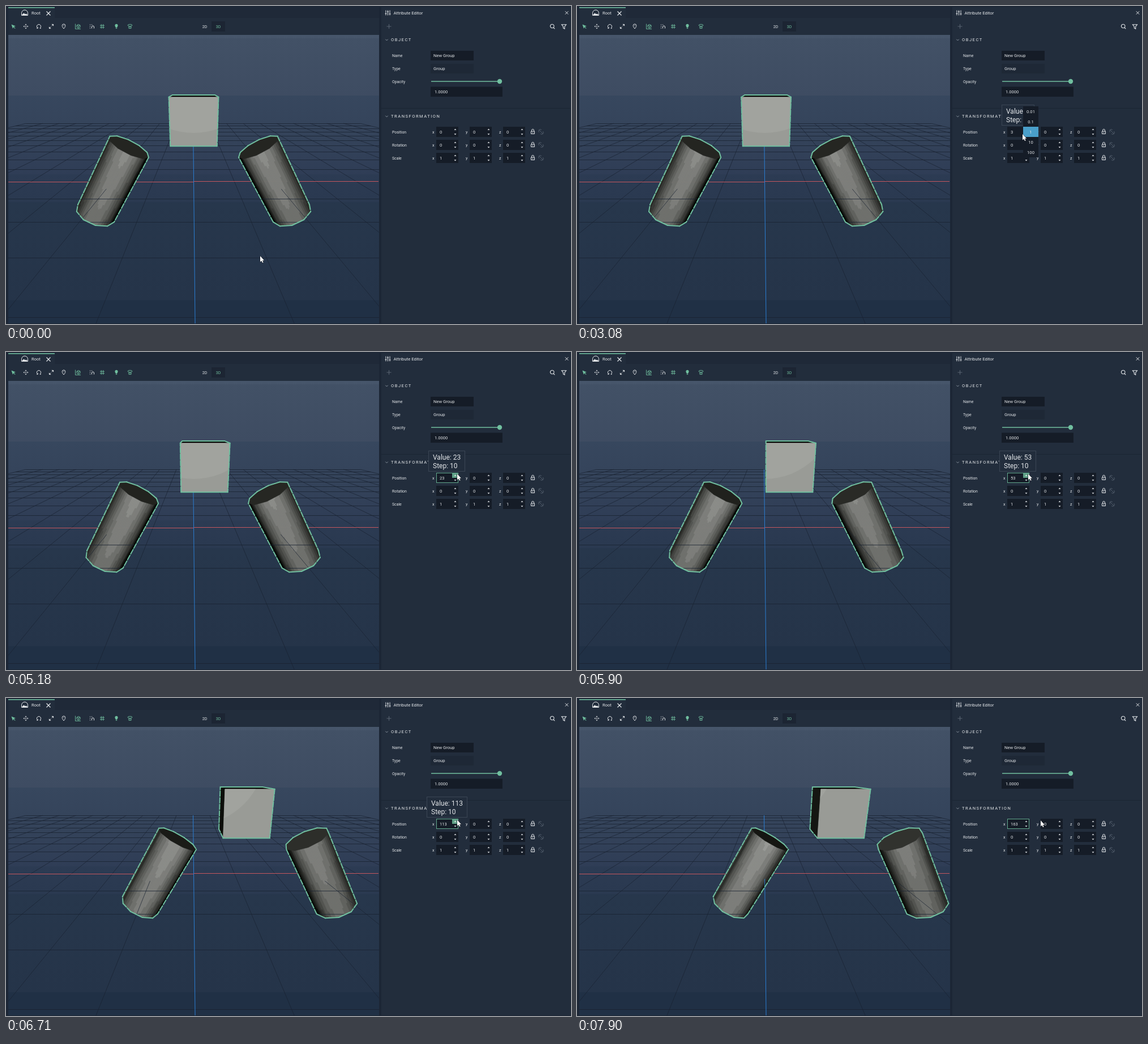
An HTML page with a canvas for the animation above (8 s loop, 998 by 561 pixels).

```html
<!DOCTYPE html>
<html lang="en">
<head>
<meta charset="utf-8">
<title>Attribute Editor</title>
<style>
html, body { margin: 0; width: 100%; height: 100%; overflow: hidden; background: #1c2635; }
canvas { display: block; width: 998px; height: 561px; }
</style>
</head>
<body>
<canvas id="stage" width="998" height="561"></canvas>
<script>
const ctx = document.getElementById('stage').getContext('2d');
const LOOP = 8000;
const TEAL = '#70bf9f', WHITE = '#e4e7ea', DARK = '#151c27', PANEL = '#222d3c', GREY = '#5a6573';

// ---------- timeline ----------
const VALUES = [[0, 0], [1600, 1], [2000, 2], [2380, 3], [4370, 13], [4900, 23], [5300, 33],
  [5750, 43], [5900, 53], [6030, 63], [6160, 73], [6290, 83], [6420, 93], [6560, 103],
  [6710, 113], [6840, 123], [6970, 133], [7110, 143], [7260, 153], [7380, 163]];
// Cursor moves: start, end, number of held steps, target
const MOVES = [[150, 1060, 8, 779, 219], [1210, 1340, 2, 797, 215], [2930, 3080, 2, 787, 226],
  [3350, 3480, 2, 797, 240], [3860, 4110, 3, 797, 215], [7780, 7900, 2, 819, 216]];
const CARET = [[1470, 1740], [2260, 2500], [4240, 4900], [5200, 5600], [6420, 6710]];

const within = (t, a, b) => t >= a && t < b;

function cursorAt(t) {
  let x = 449, y = 441;
  for (const [a, b, n, tx, ty] of MOVES) {
    if (t < a) break;
    const k = Math.min(n, 1 + Math.floor((t - a) / (b - a) * (n - 1) + 1e-6)) / n;
    const e = k * k * (3 - 2 * k);
    x += (tx - x) * e;
    y += (ty - y) * e;
  }
  return [x, y];
}

function stateAt(t) {
  return {
    value: VALUES.filter(k => k[0] <= t).pop()[1],
    step: t < 3620 ? 1 : 10,
    cursor: cursorAt(t),
    hover: within(t, 1340, 2780) || within(t, 4110, 7780),
    pressed: within(t, 6420, 6560),
    focus: within(t, 1470, 2780) || t >= 4240,
    tip: within(t, 1740, 3620) || within(t, 4520, 7780),
    menu: within(t, 2780, 3620),
    pick: t < 3480 ? 2 : 3,
    caret: CARET.some(c => within(t, c[0], c[1]))
  };
}

// ---------- drawing helpers ----------
function rect(x, y, w, h, color) {
  ctx.fillStyle = color;
  ctx.fillRect(x, y, w, h);
}

function text(s, x, y, size = 7.6, color = WHITE, align = 'left', spacing = 0) {
  ctx.font = size + 'px Roboto, sans-serif';
  ctx.letterSpacing = spacing + 'px';
  ctx.textAlign = align;
  ctx.textBaseline = 'alphabetic';
  ctx.fillStyle = color;
  ctx.fillText(s, x, y + size * 0.36);
  ctx.letterSpacing = '0px';
}

function icon(d, x, y, color, fill = false, width = 1) {
  ctx.save();
  ctx.translate(x, y);
  const p = new Path2D(d);
  ctx.lineWidth = width;
  ctx.strokeStyle = ctx.fillStyle = color;
  if (fill) ctx.fill(p); else ctx.stroke(p);
  ctx.restore();
}

function trace(pts) {
  ctx.beginPath();
  pts.forEach(([x, y], i) => i ? ctx.lineTo(x, y) : ctx.moveTo(x, y));
  ctx.closePath();
}

function poly(pts, color) {
  trace(pts);
  ctx.fillStyle = ctx.strokeStyle = color;
  ctx.fill();
  ctx.lineWidth = 0.7;
  ctx.stroke();
}

function line(x1, y1, x2, y2, color, width = 1) {
  ctx.beginPath();
  ctx.moveTo(x1, y1);
  ctx.lineTo(x2, y2);
  ctx.strokeStyle = color;
  ctx.lineWidth = width;
  ctx.stroke();
}

// ---------- camera and light ----------
const FOCAL = 467.5, DIST = 649, SIN = 0.35, COS = 0.937;
const EYE = [0, DIST * SIN, DIST * COS];

function project([x, y, z]) {
  const k = FOCAL / (DIST - y * SIN - z * COS);
  return [331.5 + x * k, 310 - (y * COS - z * SIN) * k];
}

function facing(p, n) {
  const l = EYE.map((e, i) => e - p[i]);
  return (l[0] * n[0] + l[1] * n[1] + l[2] * n[2]) / Math.hypot(...l);
}

const tone = d => {
  d = Math.max(0, d);
  return 5 + 140 * d ** 1.25 + 16 * d ** 30;
};
const grey = c => `rgb(${c | 0},${c + 1 | 0},${Math.max(0, c - 3) | 0})`;

function hull(pts) {
  const sorted = [...pts].sort((a, b) => a[0] - b[0] || a[1] - b[1]);
  const half = list => {
    const h = [];
    for (const p of list) {
      while (h.length > 1) {
        const [a, b] = h.slice(-2);
        if ((b[0] - a[0]) * (p[1] - a[1]) - (b[1] - a[1]) * (p[0] - a[0]) > 0) break;
        h.pop();
      }
      h.push(p);
    }
    return h.slice(0, -1);
  };
  return [...half(sorted), ...half(sorted.reverse())];
}

function outline(pts) {
  const h = hull(pts);
  ctx.lineCap = 'round';
  h.forEach((a, i) => {
    const b = h[(i + 1) % h.length];
    const steep = Math.abs(b[1] - a[1]) > Math.abs(b[0] - a[0]);
    ctx.setLineDash(steep ? [9, 2.6] : []);
    line(...a, ...b, TEAL, 2);
  });
  ctx.setLineDash([]);
  ctx.lineCap = 'butt';
}

// ---------- scene ----------
function grid() {
  const HORIZON = 135.5, ink = 'rgba(24,33,48,.85)';
  const u = n => 1 / (0.005714 - 0.0008245 * n);
  const far = u(-10);
  const at = (m, v) => 329.8 + v * (0.01 + 0.412 * m);
  for (let n = -10; n <= 4; n++) {
    const y = Math.floor(HORIZON + u(n)) + 0.5;
    if (n) line(at(-10, u(n)), y, at(10, u(n)), y, ink, 0.9);
  }
  for (let m = -10; m <= 10; m++) {
    if (m) line(at(m, far), HORIZON + far, at(m, 426), 561, ink, 0.8);
  }
  line(4, 310.5, 331, 310.5, '#c4565d');
  line(331, 309.5, 658, 309.5, '#c4565d');
  line(at(0, far), HORIZON + far, at(0, 426), 561, '#2b7fd4');
}

function backdrop() {
  const g = ctx.createLinearGradient(0, 51, 0, 561);
  [[51, '#47566b'], [57, '#46556a'], [57, '#425166'], [158, '#3e4c62'], [158, '#37475e'],
    [230, '#34435a'], [297, '#2f3d56'], [297, '#2c3b53'], [346, '#2a3950'], [346, '#27374c'],
    [519, '#253449'], [519, '#203045'], [561, '#203045']]
    .forEach(([y, c]) => g.addColorStop((y - 51) / 510, c));
  rect(4, 51, 655, 509, g);
}

function cube(v) {
  const p = (x, y, z) => project([v + x * 50, 150 + y * 50, z * 50]);
  const face = (a, b, c, d) => [p(...a), p(...b), p(...c), p(...d)];
  poly(face([-1, 1, 1], [1, 1, 1], [1, 1, -1], [-1, 1, -1]), '#050604');
  if (v > 50) {
    const c = tone(facing([v - 50, 150, 0], [-1, 0, 0]));
    poly(face([-1, 1, 1], [-1, 1, -1], [-1, -1, -1], [-1, -1, 1]), grey(c));
  }
  const front = face([-1, 1, 1], [1, 1, 1], [1, -1, 1], [-1, -1, 1]);
  poly(front, '#999b96');
  ctx.save();
  trace(front);
  ctx.clip();
  ctx.beginPath();
  ctx.arc(331.5, 98, 126, 0, 7);
  ctx.fillStyle = '#a1a39e';
  ctx.fill();
  ctx.restore();
  const all = [];
  for (let i = 0; i < 8; i++) all.push(p(i & 1 ? 1 : -1, i & 2 ? 1 : -1, i & 4 ? 1 : -1));
  outline(all);
}

// side is 1 for the left cylinder, -1 for its mirror image
function cylinder(v, side) {
  const N = 10, SUB = 10, ROWS = 50, BAND = 14, A = 0.5, B = 0.866;
  const ring = i => [Math.cos(i * 2 * Math.PI / N), Math.sin(i * 2 * Math.PI / N)];
  const point = ([c, s], h) => [v + side * (-200 + h * A + 50 * c * B), h * B - 50 * c * A, 50 * s];
  const normal = ([c, s]) => [side * c * B, -c * A, s];
  const mix = (a, b, k) => a.map((e, i) => e + (b[i] - e) * k);
  const rim = h => Array.from({ length: N }, (_, i) => project(point(ring(i), h)));

  function shade(c, h) {
    let d = facing(point(c, h), normal(c).map(e => e / Math.hypot(...c)));
    d -= 0.25 * Math.max(0, c[0]) ** 3;
    d = Math.max(d, 0.42 * Math.max(0, -c[0]));
    return Math.round(tone(d) / BAND) * BAND;
  }

  for (let i = 0; i < N; i++) {
    const a = ring(i), b = ring(i + 1), mid = mix(a, b, 0.5);
    if (facing(point(mid, 0), normal(mid)) <= 0) continue;
    for (let j = 0; j < SUB; j++) {
      const l = mix(a, b, j / SUB), r = mix(a, b, (j + 1) / SUB), m = mix(l, r, 0.5);
      let start = 0, tint = null;
      for (let k = 0; k <= ROWS; k++) {
        const next = k < ROWS ? shade(m, -100 + 200 * (k + 0.5) / ROWS) : -1;
        if (next === tint) continue;
        if (tint !== null) {
          const h0 = -100 + 200 * start / ROWS, h1 = -100 + 200 * k / ROWS;
          poly([point(l, h0), point(r, h0), point(r, h1), point(l, h1)].map(project), grey(tint));
        }
        start = k;
        tint = next;
      }
    }
  }
  const top = rim(100), bottom = rim(-100);
  poly(top, grey(tone(facing(point([0, 0], 100), [side * A, B, 0]))));

  // The half under the floor shows the grid in front of it
  const cut = [];
  for (let i = 0; i <= N / 2; i++) cut.push(project(point(ring(i), 50 * ring(i)[0] * A / B)));
  ctx.save();
  trace([...cut, ...bottom.slice(0, N / 2 + 1).reverse()]);
  ctx.clip();
  grid();
  ctx.restore();
  outline([...top, ...bottom]);
}

function viewport(v) {
  ctx.save();
  ctx.beginPath();
  ctx.rect(4, 51, 655, 509);
  ctx.clip();
  backdrop();
  grid();
  cube(v);
  cylinder(v, 1);
  cylinder(v, -1);
  ctx.restore();
}

// ---------- interface ----------
function toolbar() {
  rect(4, 2, 655, 49, PANEL);
  rect(86, 2, 573, 19, '#1f2938');
  rect(4, 2, 82, 1.6, TEAL);
  icon('M-5.5 4.5V.5A5.5 5.5 0 0 1 5.5 .5V4.5Z', 33, 12, WHITE);
  icon('M-4.5 4.5V3L-1.5 .5L1 2.5L2.5 1.5L4.5 3V4.5Z', 33, 12, WHITE, true);
  text('Root', 45, 12.5);
  icon('M-3.5 -3.5L3.5 3.5M3.5 -3.5L-3.5 3.5', 75, 13, WHITE, false, 1.2);

  icon('M-3.5 -3.5L4 -.5L1 .6L3.5 3.3L2.8 4L.2 1.3L-1 4Z', 13, 36, TEAL, true);
  icon('M0 -4.5L1.6 -2.4H-1.6ZM0 4.5L1.6 2.4H-1.6ZM-4.5 0L-2.4 -1.6V1.6ZM4.5 0L2.4 -1.6V1.6ZM-.8 -.8H.8V.8H-.8Z', 35, 36, WHITE, true);
  icon('M-2.2 3A3.6 3.6 0 1 1 2.2 3M-3.8 3.3H-1.8V1.3M3.8 3.3H1.8', 58, 36, WHITE);
  icon('M-3.5 3.5L-.8 .8M.8 -.8L3.5 -3.5M.8 -3.6H3.6V-.8M-.8 3.6H-3.6V.8', 80, 36, WHITE);
  icon('M0 4C-3 .5 -2.8 -.5 -2.8 -1.3A2.8 2.8 0 0 1 2.8 -1.3C2.8 -.5 3 .5 0 4ZM-.6 -1.3H.6', 102, 36, WHITE);
  icon('M-4.5 -4.5V4.5H5M-2 -2L1 -3.5L4 -2V1.5L1 3L-2 1.5ZM-2 -2L1 -.5L4 -2M1 -.5V3', 127, 36, TEAL, false, 0.9);
  icon('M-4 -3H-2.8M-1 -3H.2M-4 0H-2.8M-4 3H-2.8M-.5 3.5V1A2 2 0 0 1 3.5 1V3.5', 152, 36, WHITE);
  icon('M-1.7 -4V4M1.7 -4V4M-4 -1.7H4M-4 1.7H4', 170, 36, TEAL, false, 0.9);
  icon('M-1.2 2C-1.2 .8 -2.6 0 -2.6 -1.6A2.6 2.6 0 0 1 2.6 -1.6C2.6 0 1.2 .8 1.2 2ZM-1.2 2.8H1.2V4H-1.2Z', 195, 36, TEAL, true);
  icon('M-4 -2A4 1.7 0 0 1 4 -2A4 1.7 0 0 1 -4 -2M-2.5 1H2.5M-2 1V3.5H2V1', 219, 36, TEAL, false, 0.9);
  rect(363, 27, 24, 18, '#1c2533');
  text('2D', 351, 36.5, 7, WHITE, 'center');
  text('3D', 375, 36.5, 7, TEAL, 'center');
}

function arrows(x, y) {
  icon('M-2 -3.3L0 -5.6L2 -3.3ZM-2 3.3L0 5.6L2 3.3Z', x, y, WHITE, true);
}

function section(title, y) {
  icon('M-2.2 -1L0 1.2L2.2 -1', 672.5, y, '#9aa4ae', false, 0.9);
  text(title, 680, y, 7.5, WHITE, 'left', 1.55);
}

function row(label, y, values, locked) {
  text(label, 682, y + 0.5, 6.9);
  values.forEach((v, i) => {
    const x = 760 + i * 59;
    text('xyz'[i], x - 7, y, 7.2);
    rect(x, y - 9, 39, 18, DARK);
    text(v, x + 6, y + 0.5);
    arrows(x + 33.5, y);
  });
  if (locked) icon('M-3 -.5H3V4H-3ZM-2 -.5V-2.2A2 2 0 0 1 2 -2.2V-.5M0 1V2.6', 930.5, y - 0.5, WHITE);
  icon('M-3.4 .8A2.9 2.9 0 0 1 .8 -3.4M3.4 -.8A2.9 2.9 0 0 1 -.8 3.4M-3.5 -3.5L3.5 3.5', 945, y, GREY, false, 0.9);
}

function panel(value) {
  rect(663, 2, 334, 558, PANEL);
  icon('M-3.5 -4.5V4.5M0 -4.5V4.5M3.5 -4.5V4.5M-5 1.5H-2M-1.5 -2H1.5M2 2H5', 674.5, 12, WHITE, false, 0.95);
  text('Attribute Editor', 684.5, 12.5, 7.75);
  icon('M-2.7 -2.7L2.7 2.7M2.7 -2.7L-2.7 2.7', 990.5, 12, WHITE);
  icon('M-4 0H4M0 -4V4', 676.5, 36, GREY);
  icon('M3 -.5A3.3 3.3 0 1 1 -3.6 -.5A3.3 3.3 0 1 1 3 -.5M2 2L4.3 4.3', 965, 36, WHITE, false, 1.1);
  icon('M-4 -3.7H4L1.2 0V3.8L-1.2 2.5V0Z', 985.5, 36.5, WHITE, false, 1.1);

  section('OBJECT', 59.7);
  text('Name', 682, 88, 6.9);
  rect(750, 79, 76, 17, DARK);
  text('New Group', 755, 87.7);
  text('Type', 682, 111, 6.9);
  rect(750, 102, 76, 17, '#1e2836');
  text('Group', 755, 110.7);
  text('Opacity', 682, 133.5, 6.9);
  line(751, 133, 872, 133, TEAL, 1.3);
  ctx.beginPath();
  ctx.arc(872, 133, 4.2, 0, 7);
  ctx.fillStyle = TEAL;
  ctx.fill();
  rect(750, 142.5, 127, 17.5, DARK);
  text('1.0000', 757, 151.5);

  line(663, 180.5, 997, 180.5, '#1b2533');
  section('TRANSFORMATION', 194.6);
  row('Position', 222, [value, 0, 0], true);
  row('Rotation', 245, [0, 0, 0], true);
  row('Scale', 268, [1, 1, 1], true);
}

function editing(s) {
  if (s.hover) {
    rect(788, 213.5, 10.5, 8.5, s.pressed ? '#44705f' : '#5fa187');
    icon('M-2 1L0 -1.3L2 1Z', 793.5, 217.7, WHITE, true);
  }
  if (s.focus) {
    ctx.strokeStyle = '#62a98d';
    ctx.lineWidth = 1;
    ctx.strokeRect(760.5, 213.5, 38, 17);
  }
  if (s.caret) line(766.5, 217, 766.5, 227, WHITE, 0.9);
}

function tooltip(s) {
  const first = 'Value: ' + s.value;
  ctx.font = '12px Roboto, sans-serif';
  const w = Math.round(ctx.measureText(first).width + 16);
  const x = Math.round(778.5 - w / 2);
  rect(x, 174, w, 37, PANEL);
  ctx.strokeStyle = '#3a4554';
  ctx.lineWidth = 1;
  ctx.strokeRect(x + 0.5, 174.5, w - 1, 36);
  text(first, x + 8, 185.5, 12);
  text('Step: ' + s.step, x + 8, 200.7, 12);
}

function stepMenu(s) {
  rect(788, 177, 27, 90, DARK);
  rect(788, 177 + s.pick * 18, 27, 18, '#4a9fca');
  ['0.01', '0.1', '1', '10', '100'].forEach((n, i) => text(n, 801.5, 186.3 + i * 18, 7.6, WHITE, 'center'));
}

function pointer([x, y]) {
  const d = 'M0 0V10.5L2.4 8.4L4 12L5.6 11.3L4 7.8H7Z';
  icon(d, x, y, '#10151d', false, 1);
  icon(d, x, y, '#ffffff', true);
}

function draw(s) {
  rect(0, 0, 998, 561, '#1c2635');
  toolbar();
  viewport(s.value);
  panel(s.value);
  editing(s);
  if (s.tip) tooltip(s);
  if (s.menu) stepMenu(s);
  pointer(s.cursor);
}

let shown = '';
function tick() {
  const s = stateAt(performance.now() % LOOP);
  const key = JSON.stringify(s);
  if (key !== shown) {
    shown = key;
    draw(s);
  }
  requestAnimationFrame(tick);
}
tick();
</script>
</body>
</html>
```
